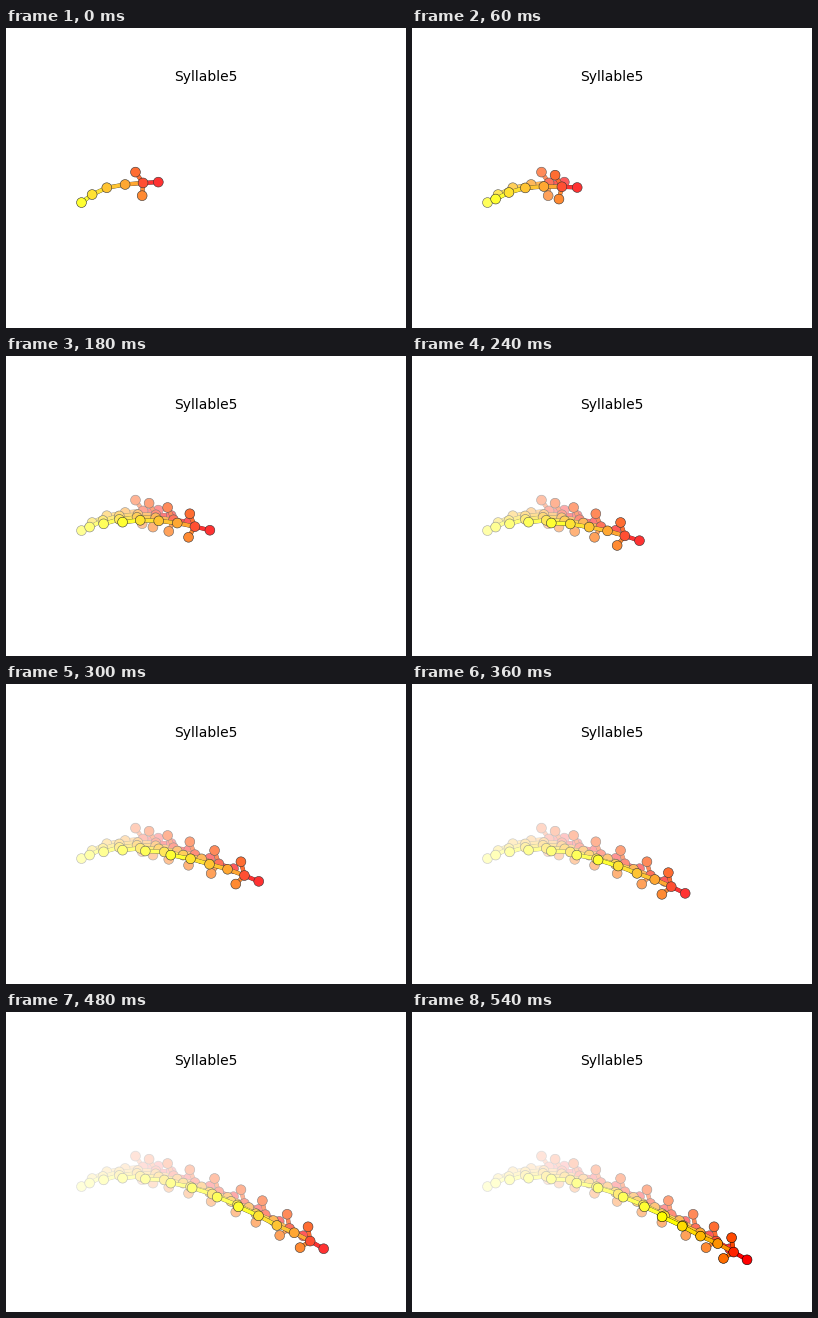
A matplotlib script for the animation above (0.6 s loop, 400x300 px).

```python
import numpy as np
import matplotlib.pyplot as plt
from matplotlib.animation import FuncAnimation

W, H, DPI = 400, 300, 100
STEPS, INTERVAL = 10, 60
FADE = 0.2
NODE_SIZE, LINE = 50, 3

# Nodes run from nose to tail; the body hangs on the middle of the spine.
NOSE, HEAD, EAR_UP, EAR_LOW, NECK, ROOT, HIP, TAIL = range(8)

# Each edge takes the colour of its first node.
EDGES = [(NOSE, HEAD), (EAR_UP, HEAD), (EAR_LOW, HEAD), (NECK, HEAD),
         (ROOT, NECK), (HIP, ROOT), (TAIL, HIP)]

# parent, child, (length at start, at end), (degrees at start, at end)
BONES = [
    (ROOT, NECK, (18.6, 18.8), (-10, 23.5)),
    (NECK, HEAD, (18, 18), (-5, 28)),
    (HEAD, NOSE, (15.3, 15.5), (-3, 30)),
    (HEAD, EAR_UP, (13.2, 14.5), (-125, -98)),
    (HEAD, EAR_LOW, (12.8, 12), (94, 148)),
    (ROOT, HIP, (16.2, 20.8), (155, 208.5)),
    (HIP, TAIL, (13.3, 22.2), (143, 205)),
]

# Uneven horizontal strides of the root between steps.
STRIDES = [12.5, 17.7, 21.7, 24.5, 26.3, 21.5, 24.9, 21, 17.6]
ROOT_X = 100.8 + np.cumsum([0] + STRIDES)


def blend(ends, t):
    return ends[0] + (ends[1] - ends[0]) * t


def pose(step):
    """Place the root on its falling path, then swing the bones from it."""
    ease = np.sin(np.pi / 2 * step / (STEPS - 1))
    d = ROOT_X[step] - 104
    pts = np.zeros((8, 2))
    pts[ROOT] = ROOT_X[step], 159.7 + 0.00228 * d**2 - 2.1e-6 * d**3
    for parent, child, length, angle in BONES:
        a = np.radians(blend(angle, ease))
        pts[child] = pts[parent] + blend(length, ease) * np.array(
            [np.cos(a), np.sin(a)])
    return pts


fig = plt.figure(figsize=(W / DPI, H / DPI), dpi=DPI, facecolor="white")
ax = fig.add_axes([0, 0, 1, 1])
ax.axis("off")
ax.text(W / 2, 53, "Syllable5", ha="center", va="baseline", color="black",
        family="DejaVu Sans", fontsize=10, zorder=100)

colors = plt.get_cmap("autumn")(np.linspace(0, 1, 8))


def draw_pose(step):
    """Add one skeleton and the white veil that covers it."""
    pts, z = pose(step), 4 * step
    parts = []
    for a, b in EDGES:
        xs, ys = pts[[a, b]].T
        parts += ax.plot(xs, ys, color="black", lw=LINE, zorder=z)
        parts += ax.plot(xs, ys, color=colors[a], lw=LINE * 0.9, zorder=z + 1)
    parts.append(ax.scatter(*pts.T, c=colors, s=NODE_SIZE, edgecolor="black",
                            linewidth=0.4, zorder=z + 2))
    if step < STEPS - 1:
        parts += ax.fill([0, W, W, 0], [0, 0, H, H], facecolor="white",
                         alpha=FADE, lw=0, zorder=z + 3)
    return parts


layers = [draw_pose(i) for i in range(STEPS)]
ax.set(xlim=(0, W), ylim=(H, 0))


def update(frame):
    for i, parts in enumerate(layers):
        for part in parts:
            part.set_visible(i <= frame)
    return []


anim = FuncAnimation(fig, update, frames=STEPS, interval=INTERVAL,
                     repeat=True, repeat_delay=0, blit=False)
plt.show()
```
